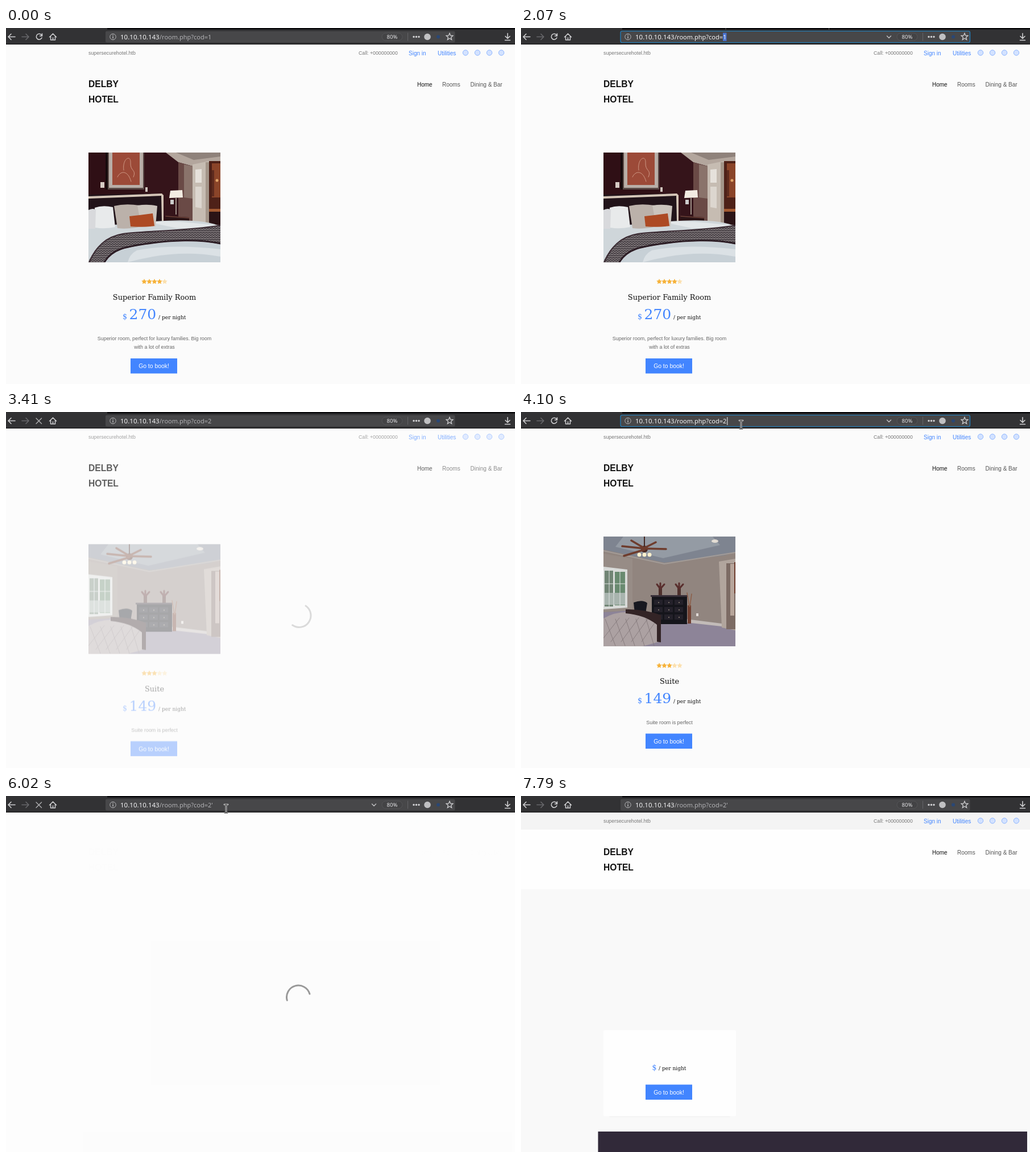
Write an HTML page that moves like this. It is 895x626 px and loops after 8330 ms.

```html
<!DOCTYPE html>
<html lang="en">
<head>
<meta charset="utf-8">
<title>Room page</title>
<style>
html, body { margin: 0; width: 100%; height: 100%; overflow: hidden; background: #fbfbfb; }
svg { display: block; width: 895px; height: 626px; }
text { white-space: pre; }
.ui { font-family: "Noto Sans", "Open Sans", sans-serif; }
.sans { font-family: "Liberation Sans", Arial, sans-serif; }
.serif { font-family: "DejaVu Serif", serif; }
.line { fill: none; stroke-width: 1.6; stroke-linecap: round; stroke-linejoin: round; }
</style>
</head>
<body>
<svg id="stage" viewBox="0 0 895 626"></svg>
<script>
const LOOP = 8330;
const BLUE = '#4285ff';
const HOTEL = 'Delby Hotel';
const HOST = '10.10.10.143';

const rect = (x, y, w, h, fill, more = '') =>
  `<rect x="${x}" y="${y}" width="${w}" height="${h}" fill="${fill}" ${more}/>`;
const poly = (points, fill) => `<polygon points="${points}" fill="${fill}"/>`;
const disc = (x, y, r, fill, more = '') => `<circle cx="${x}" cy="${y}" r="${r}" fill="${fill}" ${more}/>`;
const path = (d, fill, more = '') => `<path d="${d}" fill="${fill}" ${more}/>`;
const stroke = (d, color, width = 1.6) =>
  `<path class="line" d="${d}" style="stroke:${color};stroke-width:${width}"/>`;
const label = (font, x, y, size, fill, str, more = '') =>
  `<text class="${font}" x="${x}" y="${y}" font-size="${size}" fill="${fill}" ${more}>${str}</text>`;
const group = (id, body, more = '') => `<g id="${id}" ${more}>${body}</g>`;
const mid = 'text-anchor="middle"';
const bold = 'font-weight="700"';

function star(cx, cy, r, inner = 0.45) {
  return Array.from({ length: 10 }, (_, i) => {
    const a = -Math.PI / 2 + i * Math.PI / 5, d = i % 2 ? r * inner : r;
    return `${(cx + d * Math.cos(a)).toFixed(2)},${(cy + d * Math.sin(a)).toFixed(2)}`;
  }).join(' ');
}

function hotelRoom() {
  return rect(145, 219, 232, 193, '#2f0f15') +
    rect(243, 219, 60, 112, '#35141a') +
    // ceiling, far wall and doorway
    poly('281,219 377,219 377,234 328,243 303,236', '#b3a69d') +
    poly('299,219 377,219 377,226 330,232', '#8f827b') +
    poly('303,236 328,243 328,346 303,340', '#6a4a46') +
    poly('313,240 328,243 328,300 313,298', '#8a736b') +
    poly('328,240 357,234 357,349 328,343', '#c6bcb2') +
    poly('333,249 344,248 344,272 333,272', '#e6e1db') +
    poly('333,279 344,279 344,317 333,315', '#dcd6cf') +
    rect(351, 236, 6, 112, '#a39589') +
    rect(357, 234, 20, 116, '#4e2118') + rect(362, 238, 15, 60, '#8a4429') +
    rect(362, 250, 4, 46, '#5e2b1e') + disc(371, 268, 2.5, '#e0a468') +
    rect(357, 318, 20, 5, '#a35a32') + rect(357, 323, 20, 27, '#2b1416') +
    // painting
    rect(175, 219, 4, 65, '#160a0c') + rect(179, 219, 64, 65, '#5a4a46') + rect(181, 219, 60, 62, '#b9aea7') +
    rect(187, 219, 48, 57, '#9c4a38') +
    stroke('M207 250C204 229 220 222 219 237S230 249 224 262M196 262C201 251 214 249 220 270', '#cf9a86', 1) +
    // headboard, lamp and night stand
    poly('145,293 274,291 274,345 145,348', '#22141a') +
    poly('145,296 274,291 277,294 277,340 274,341 273,295 145,300', '#d5c6b8') +
    rect(166, 271, 7, 10, '#d7cbc4') + rect(245, 280, 4, 8, '#cfc4bd') +
    rect(289, 302, 6, 8, '#ccc') + rect(298, 299, 2, 29, '#9d8f86') +
    poly('289,286 310,285 311,298 287,299', '#f3ece2') +
    poly('281,330 322,333 322,347 281,344', '#2b1416') + stroke('M281 331L322 334', '#6d4138', 1.5) +
    // bed
    path('M145 352Q178 346 262 340T377 349V412H145Z', '#cfd6da') +
    path('M250 341Q290 338 340 344L377 347V354L300 352Z', '#e3e7e9') +
    path('M156 316Q170 311 188 315L192 350Q172 354 157 351Z', '#e8eaeb') +
    path('M145 320Q154 316 158 320L157 353H145Z', '#d8d9dc') +
    path('M190 313Q210 308 235 312L233 350Q212 354 196 352Z', '#bbb1aa') +
    path('M231 312Q250 309 266 313L263 349L238 350Z', '#cbc4bd') +
    path('M217 331Q237 329 258 326L261 348Q240 351 219 349Z', '#ad4a24') +
    path('M145 411C157 385 175 367 205 362S320 357 377 347V379C340 371 290 373 250 379S187 388 173 412H145Z', 'url(#zigzag)') +
    stroke('M147 411C158 385 175 367 205 362S320 357 377 347', '#3a2a32', 2) +
    stroke('M377 379C340 371 290 373 250 379S187 388 173 412', '#2c1d25', 3) +
    path('M377 381C340 373 290 375 250 381S189 390 175 412H377Z', '#c7d0d6') +
    path('M230 391Q290 379 377 389V402Q300 388 214 412Q217 398 230 391Z', '#dbe1e5');
}

function suiteRoom() {
  const drawers = [0, 1, 2].map(row => [0, 1, 2].map(col =>
    rect(234 + col * 18, 330 + row * 13, 15, 9, '#24212a') +
    disc(242 + col * 18, 335 + row * 13, 1, '#92877a')).join('')).join('');
  const vase = x => rect(x - 3, 309, 6, 15, '#4d302c') +
    stroke(`M${x} 311L${x - 6} 303M${x} 311V301M${x} 311L${x + 7} 303`, '#592e2d', 3);
  const quilt = [0, 1, 2, 3, 4].map(i =>
    stroke(`M${148 + i * 18} 364L${166 + i * 17} 411M${173 + i * 17} 362L${140 + i * 18} 404`, '#7f7477', 0.8)).join('');
  return rect(145, 219, 232, 193, '#91857f') +
    poly('145,219 377,219 377,246 358,252 252,265 145,242', '#7e8490') +
    poly('180,219 337,219 350,234 250,257 166,237', '#949ba4') +
    stroke('M145 244L252 267L377 247', '#a39c98', 2) +
    poly('145,249 196,258 196,349 145,351', '#978c86') +
    poly('145,272 187,277 187,344 145,347', '#d8dad8') +
    rect(147, 279, 15, 63, '#718575') + rect(165, 281, 18, 59, '#698a70') +
    rect(147, 318, 36, 21, '#a8b4ae') +
    stroke('M163 276V344M147 302H184M155 277V342M174 279V340', '#dfe2e1', 1) +
    poly('145,352 210,348 290,366 377,380 377,412 145,412', '#8d8498') +
    poly('290,364 353,372 353,377 290,370', '#c2bbb8') +
    poly('348,263 377,258 377,384 353,379', '#b1a59d') +
    rect(361, 266, 16, 116, '#7c6b64') + rect(368, 267, 7, 91, '#b7a59b') + rect(375, 264, 2, 55, '#6d3c2e') +
    path('M198 335Q214 329 222 336L219 354H200Z', '#171820') +
    stroke('M201 351L198 362M219 350L220 364', '#17171c', 2) +
    vase(245) + vase(278) +
    rect(230, 323, 62, 50, '#15151b') + drawers + rect(228, 322, 65, 3, '#383039') +
    rect(293, 340, 6, 32, '#703f31') + stroke('M296 342L292 318M297 342L300 320', '#8c5c46', 1.5) +
    rect(308, 354, 4, 5, '#dfd8d4') +
    path('M145 363Q174 347 205 354Q237 357 243 375V404L214 412H145Z', '#aca1a2') + quilt +
    path('M184 347Q215 346 246 357V405L239 404V374Q218 357 184 354Z', '#332426') +
    rect(216, 219, 2, 18, '#442721') + disc(217, 241, 6, '#4a2922') +
    stroke('M217 240L178 236M217 240L255 241M217 239L237 229M216 239L194 226M217 242L181 253', '#6e3c2d', 3.5) +
    [208, 217, 226].map(x => disc(x, 251, 3.5, '#fff0cc')).join('') +
    `<ellipse cx="341" cy="227" rx="6" ry="3" fill="#f7eee0" opacity=".8"/>`;
}

function header() {
  const nav = [[723, 'Home', '#111'], [767, 'Rooms', '#555'], [816.5, 'Dining &amp; Bar', '#555']];
  const [first, second] = HOTEL.toUpperCase().split(' ');
  return label('sans', 145, 47, 8.9, '#777', 'supersecurehotel.htb') +
    label('sans', 620, 47, 8.75, '#777', 'Call: +000000000') +
    label('sans', 708, 48, 10, BLUE, 'Sign in') + label('sans', 759, 48, 10, BLUE, 'Utilities') +
    [808, 829, 850, 871].map(x => disc(x, 43.5, 4.7, '#d3e2ff', 'stroke="#8db5ff"')).join('') +
    label('sans', 145, 104, 15.6, '#111', first, bold) +
    label('sans', 145, 131, 15.6, '#111', second, bold) +
    nav.map(([x, s, c]) => label('sans', x, 102.5, 10, c, s)).join('');
}

const button = y => rect(219, y, 82, 26.5, BLUE) +
  label('sans', 260, y + 17, 10.4, '#fff', 'Go to book!', mid);

function roomPage(id, photo, stars, title, price, lines, buttonY) {
  const rating = [0, 1, 2, 3, 4].map(i =>
    poly(star(243 + i * 9, 446, 5, 0.5), i < stars ? '#f6b23a' : '#fbe0ae')).join('');
  return group(id, rect(0, 29, 895, 597, '#fbfbfb') + header() + `<g class="card">` + photo + rating +
    label('serif', 261, 477.5, 12.9, '#111', title, mid) +
    label('serif', 205, 511.5, 12.6, BLUE, '$') + label('serif', 216.5, 511.5, 25, BLUE, price) +
    label('serif', 268, 511.5, 9.1, '#111', '/ per night') +
    lines.map((s, i) => label('sans', 261, 549 + i * 15, 8.9, '#666', s, mid)).join('') +
    button(buttonY) + '</g>');
}

function emptyPage() {
  return group('empty', rect(0, 29, 895, 597, '#f9f9f9') + rect(0, 29, 895, 30, '#f4f4f4') +
    rect(0, 59, 895, 105, '#fefefe') + header() + '<g class="card">' +
    rect(155, 560, 213, 5, '#f4f4f4', 'rx="2"') + rect(145, 412, 233, 151, '#fefefe', 'rx="2"') +
    label('serif', 230.5, 482, 12.6, BLUE, '$') + label('serif', 242, 482, 9.1, '#111', '/ per night') +
    button(507.5) + '</g>' + rect(135.5, 590, 754.5, 36, '#312939'));
}

function toolbar() {
  const icon = '#d0d0d2';
  const pageActions = group('actions',
    [717, 721.5, 726].map(x => disc(x, 15.5, 1.7, icon)).join('') +
    disc(741, 15.5, 5.8, '#c0c0c2'));
  return rect(0, 0, 895, 28, '#323234') + rect(178, 0, 717, 2.5, '#0b0b0d') + rect(0, 28, 895, 1, '#0c0c0d') +
    group('tabs', rect(359.5, 0, 1, 3, '#59595c') + rect(541, 0, 1, 3, '#59595c')) +
    group('tabBusy', rect(0, 0, 75, 2, '#235078')) +
    stroke('M16 15.5H4M9 10.5L4 15.5L9 20.5', icon) +
    stroke('M28 15.5H40M35 10.5L40 15.5L35 20.5', '#68686b') +
    group('reload', stroke('M62.5 12.5A5 5 0 1 0 63 17M63.5 10V14H59.5', icon)) +
    group('stop', stroke('M53 11L62.5 20.5M62.5 11L53 20.5', 'currentColor', 1.4)) +
    stroke('M76.5 16L82.5 10L88.5 16M78.5 15V21H86.5V15M82.5 21V17', icon, 1.5) +
    rect(175, 5.5, 614.5, 20, '#474749', 'id="field" rx="2.5" stroke="#2184c4" stroke-width="0"') +
    group('info', disc(188, 15.5, 5.2, 'none', 'stroke="#b8b8ba"') +
      rect(187.4, 14.6, 1.3, 4, '#c8c8ca') + rect(187.4, 12, 1.3, 1.4, '#c8c8ca')) +
    group('lens', disc(186.5, 14, 4, 'none', 'stroke="#b8b8ba" stroke-width="1.4"') + stroke('M189.5 17L193 20.5', '#b8b8ba')) +
    rect(355, 8.5, 6.5, 14.5, '#4a73cf', 'id="selection"') +
    label('ui', 201, 20, 11.55, '#f4f4f5', HOST) + label('ui', 270, 20, 11, '#b4b4b7', '', 'id="query"') +
    rect(362.3, 9, 1, 14, '#f4f4f5', 'id="caret"') +
    group('chevron', stroke('M643.5 14L647 17.5L650.5 14', '#bdbdbf', 1.5)) +
    group('zoom', rect(661, 9, 36, 13, '#434345', 'rx="6.5" stroke="#59595b" stroke-width=".8"') +
      label('ui', 679, 19, 9.6, '#e4e4e6', '80%', mid)) +
    group('divider', rect(706, 8.5, 1, 14, '#656568')) + pageActions +
    group('addon', disc(760, 15.5, 3, '#2a4775')) +
    group('star', `<polygon points="${star(780, 15.5, 6.2)}" fill="none" stroke="${icon}" stroke-width="1.3"/>`) +
    group('go', stroke('M729 15.5H740M735.5 11L740 15.5L735.5 20', '#c4c4c6', 1.4)) +
    stroke('M882 9.5V18M878 14.5L882 18.5L886 14.5M877.5 21.5H886.5', icon);
}

function dropdown() {
  const globe = (y, c) => disc(330.5, y, 5.7, 'none', `stroke="${c}" stroke-width="1.2"`) +
    `<ellipse cx="330.5" cy="${y}" rx="2.6" ry="5.7" fill="none" stroke="${c}"/>` +
    stroke(`M325 ${y - 2}H336M325 ${y + 2}H336`, c, 1);
  const history = ['1,2,3,4,5,6,7', '1,2,3,4,5,6', '1,2', "'1'"].map((cols, i) => {
    const y = 71.5 + i * 24.2;
    return globe(y, '#555') + label('ui', 344, y + 4.5, 12.1, '#111', HOTEL) +
      label('ui', 413, y + 4, 10.3, '#888', '—') +
      label('ui', 428, y + 4, 10.2, BLUE,
        `<tspan ${bold}>${HOST}/room.php?cod=<tspan class="value"></tspan></tspan> <tspan font-size="10.5">or 1=2 UNION SELECT ${cols};-- -</tspan>`);
  }).join('');
  const engines = ['#4285f4', '#00897b', '#f29a2e', '#d5306a', '#e5582b', '#e7a31a', '#1da1f2', '#222'];
  return group('dropdown',
    rect(136, 37, 4, 22, '#e2e2e2') + rect(139, 29, 760, 188, '#f9f9f9', 'stroke="#a4a4a4"') +
    rect(139, 217.5, 756, 2, '#d8d8d8') +
    rect(142.5, 34.5, 752.5, 24.5, '#1f8bcd') + globe(47, '#eaf5fc') +
    label('ui', 344, 51.5, 11.5, '#fff',
      `http://<tspan ${bold}>${HOST}/room.php?cod=<tspan class="value"></tspan></tspan>`) +
    label('ui', 561, 51.5, 10.2, '#e4f1fa', '—  Visit') + history +
    rect(139, 165.5, 756, 1, '#b4b4b4') +
    label('ui', 144, 182, 11.25, '#777',
      `Search for <tspan fill="#222">${HOST}/room.php?cod=<tspan class="value"></tspan></tspan> with:`) +
    rect(139, 189.5, 756, 1, '#b4b4b4') +
    engines.map((c, i) => disc(159.5 + i * 39.5, 203, 5.5, c) +
      (i < 7 ? rect(179 + i * 39.5, 195, 1, 16, '#b4b4b4') : '')).join(''));
}

const beamShape = 'M-3 -7.5H-1L0 -6.5L1 -7.5H3M0 -6.5V6.5M-3 7.5H-1L0 6.5L1 7.5H3';
const stage = document.getElementById('stage');
stage.innerHTML = `<defs>
  <clipPath id="photo"><rect x="145" y="219" width="232" height="193"/></clipPath>
  <pattern id="zigzag" width="5" height="4" patternUnits="userSpaceOnUse">
    <rect width="5" height="4" fill="#4b4449"/><path d="M0 3L2.5 1L5 3" fill="none" stroke="#a39b9b"/>
  </pattern></defs>` +
  roomPage('family', `<g clip-path="url(#photo)">${hotelRoom()}</g>`, 4, 'Superior Family Room', '270',
    ['Superior room, perfect for luxury families. Big room', 'with a lot of extras'], 581) +
  roomPage('suite', `<g clip-path="url(#photo)">${suiteRoom()}</g>`, 3, 'Suite', '149', ['Suite room is perfect'], 565.5) +
  emptyPage() +
  group('veil', rect(0, 29, 895, 597, '#fdfdfd') +
    group('spinner', stroke('M526 340A20.5 20.5 0 0 1 505 375.5', '#999', 3))) +
  toolbar() + dropdown() +
  group('pointer',
    group('beam', stroke(beamShape, '#fff', 2.6) + stroke(beamShape, '#222', 1.1)) +
    group('arrow', path('M0 -1V12L3 9.3L5.2 14L7.2 13L5 8.6H9Z', '#111', 'stroke="#fff" stroke-width=".8"')));

const ui = Object.fromEntries([...stage.querySelectorAll('[id]')].map(e => [e.id, e]));
const values = stage.querySelectorAll('.value');
const show = (name, on) => { ui[name].style.display = on ? '' : 'none'; };
const clamp = v => Math.max(0, Math.min(1, v));
const within = (t, a, b) => t >= a && t < b;

// Each track is visible from its first to its last key: time, x, y.
const tracks = [
  [[130, 796, 517], [330, 690, 330], [680, 454, 22], [750, 454, 22]],
  [[910, 359, 14], [1060, 352, 15], [1210, 351, 15], [1440, 352.5, 15.5], [1670, 359, 15.5], [1800, 363, 16], [2070, 450, 380]],
  [[4020, 387, 22.5], [5100, 387, 22.5]],
  [[5480, 387, 22.5], [7100, 387, 22.5], [7400, 535, 220], [7790, 797, 614]]
];

function pointerAt(t) {
  const track = tracks.find(k => within(t, k[0][0], k[k.length - 1][0]));
  if (!track) return null;
  const i = track.findIndex(k => k[0] > t);
  const [t0, x0, y0] = track[i - 1], [t1, x1, y1] = track[i];
  const f = (t - t0) / (t1 - t0);
  return [x0 + (x1 - x0) * f, y0 + (y1 - y0) * f];
}

function reveal(page, t, start) {
  const rest = (1 - clamp((t - start) / 600)) ** 3;
  const card = ui[page].querySelector('.card');
  card.setAttribute('transform', `translate(0 ${(30 * rest).toFixed(2)})`);
  card.setAttribute('opacity', 1 - rest);
  ui.veil.setAttribute('opacity', 1 - clamp((t - start + 180) / 480));
  ui.spinner.setAttribute('transform', `rotate(${(t - 6400) * 0.36} 514 356)`);
}

function render(t) {
  const page = t < 3090 ? 'family' : t < 5900 ? 'suite' : 'empty';
  ['family', 'suite', 'empty'].forEach(p => show(p, p === page));
  show('veil', page !== 'family');
  if (page === 'suite') reveal(page, t, 3270);
  if (page === 'empty') reveal(page, t, 6200);

  const value = t < 2460 ? '1' : t < 5100 ? '2' : "2'";
  const focused = within(t, 1670, 2860) || within(t, 4020, 5570);
  const typed = within(t, 2460, 2860) || within(t, 5100, 5570);
  const busy = within(t, 2860, 3700) || within(t, 5570, 6940);
  const compact = within(t, 2860, 3240);
  ui.query.textContent = '/room.php?cod=' + value;
  ui.query.setAttribute('fill', focused ? '#f4f4f5' : '#b0b0b3');
  values.forEach(v => { v.textContent = value; });
  ui.field.setAttribute('stroke-width', focused ? 1.2 : 0);
  show('selection', within(t, 1750, 2460));
  show('caret', within(t, 4100, 5100));
  show('dropdown', within(t, 2540, 2860) || within(t, 5170, 5570));
  show('info', !typed);
  show('lens', typed);
  show('go', typed);
  ['divider', 'actions', 'star'].forEach(n => show(n, !typed));
  show('addon', !typed && !compact);
  show('chevron', !typed && (within(t, 680, 2460) || within(t, 4020, 5100) || within(t, 5570, 7110)));
  ui.zoom.setAttribute('transform', `translate(${typed ? 87.5 : compact ? 19.5 : 0} 0)`);
  ['divider', 'actions'].forEach(n => ui[n].setAttribute('transform', `translate(${compact ? 19.5 : 0} 0)`));
  show('reload', !busy);
  show('stop', busy);
  ui.stop.style.color = t > 6350 ? '#666669' : '#b0b0b2';
  show('tabs', within(t, 910, 3240));
  show('tabBusy', within(t, 6350, 6800));

  const at = pointerAt(t);
  show('pointer', at);
  if (at) {
    const beam = at[1] < 29 && !typed;
    show('beam', beam);
    show('arrow', !beam);
    ui.pointer.setAttribute('transform', `translate(${at[0].toFixed(1)} ${at[1].toFixed(1)})`);
  }
}

const began = performance.now();
function tick() {
  render((performance.now() - began) % LOOP);
  requestAnimationFrame(tick);
}
tick();
</script>
</body>
</html>
```
